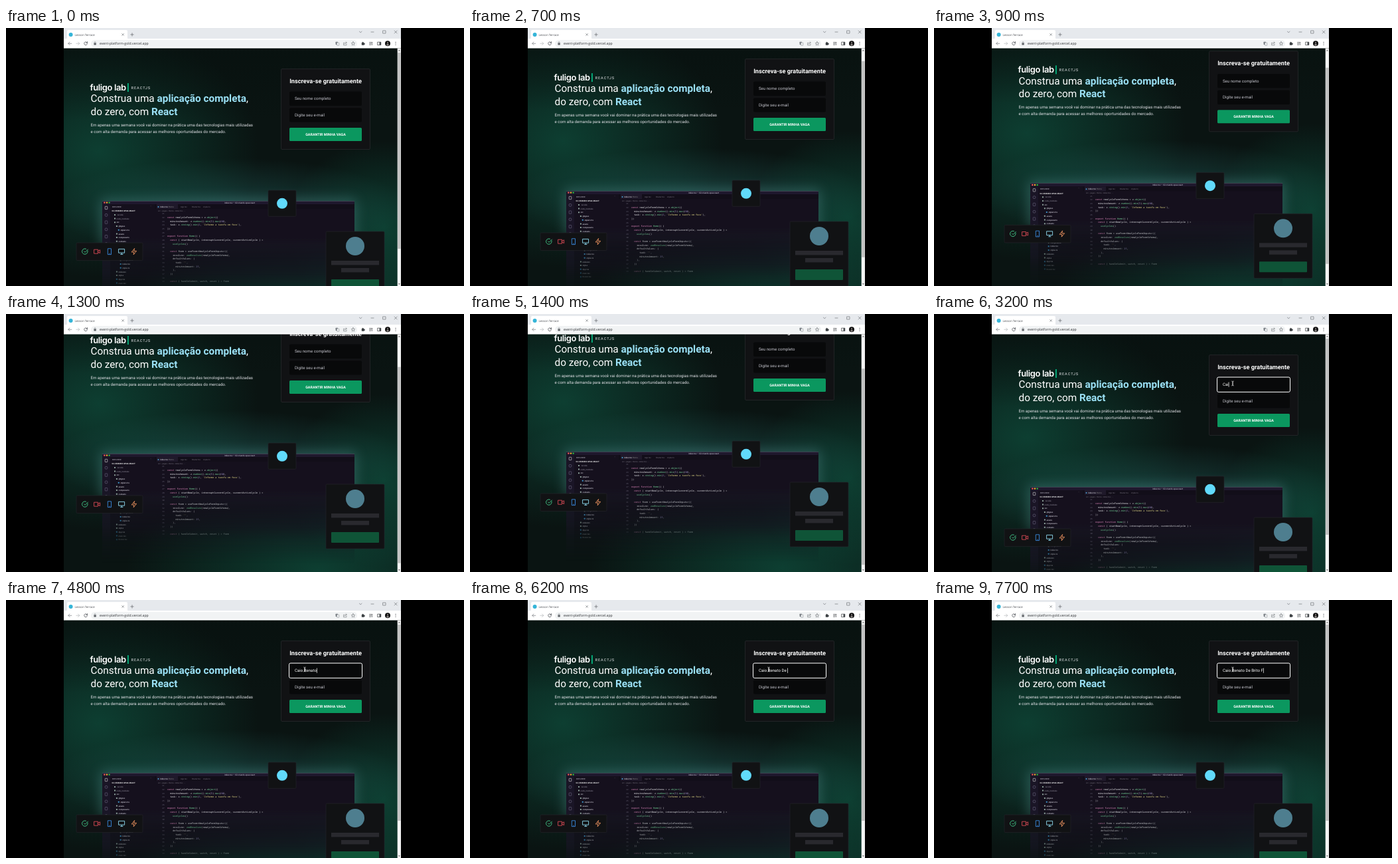
An HTML page for the animation above (8 s loop, 690 px wide and 388 px high).

```html
<!DOCTYPE html>
<html lang="pt-BR">
<head>
<meta charset="utf-8">
<title>Lesson Terrace</title>
<style>
html, body { margin: 0; width: 100%; height: 100%; overflow: hidden; background: #000; }
svg { display: block; width: 690px; height: 388px; font-family: Roboto, sans-serif; text-rendering: geometricPrecision; }
.ui { font-family: "Open Sans", sans-serif; }
.mono { font-family: "Noto Sans Mono", monospace; font-weight: 500; }
.line { fill: none; stroke-linecap: round; stroke-linejoin: round; }
</style>
</head>
<body>
<svg id="stage" viewBox="0 0 690 388"></svg>
<script>
const LOOP = 8000, TICK = 100;
const NAME = 'Caio Renato De Brito F';
const SCROLL = [[500, 0], [600, 7], [700, 15], [1300, 50], [1400, 53], [1500, 47], [1800, 5], [1900, 0]];
// time at which the number of typed letters is reached
const TYPED = [[2800, 1], [3000, 2], [3200, 3], [3400, 4], [3800, 5], [3900, 6], [4100, 7], [4200, 8],
  [4300, 10], [4800, 11], [5000, 12], [5400, 13], [5800, 14], [6000, 15], [6500, 16], [7000, 18],
  [7100, 20], [7400, 21], [7700, 22]];
const FOCUS = 2000;

const rect = (x, y, w, h, fill, more = '') =>
  `<rect x="${x}" y="${y}" width="${w}" height="${h}" fill="${fill}" ${more}/>`;
const dot = (x, y, r, fill, more = '') => `<circle cx="${x}" cy="${y}" r="${r}" fill="${fill}" ${more}/>`;
const text = (x, y, size, fill, str, more = '') =>
  `<text x="${x}" y="${y}" font-size="${size}" fill="${fill}" ${more}>${str}</text>`;
const line = (d, color, width = 0.8) => `<path class="line" d="${d}" stroke="${color}" stroke-width="${width}"/>`;
const glow = (id, color, alpha) => `<radialGradient id="${id}">
  <stop offset="0" stop-color="${color}" stop-opacity="${alpha}"/>
  <stop offset=".5" stop-color="${color}" stop-opacity="${alpha * 0.5}"/>
  <stop offset="1" stop-color="${color}" stop-opacity="0"/></radialGradient>`;
const blob = (id, x, y, rx, ry) => `<ellipse cx="${x}" cy="${y}" rx="${rx}" ry="${ry}" fill="url(#${id})"/>`;

function backdrop() {
  return rect(87, 30, 504, 430, '#0a1412')
    + blob('green', 140, 185, 240, 190) + blob('green', 470, 435, 290, 150)
    + blob('green', 570, 300, 150, 130) + blob('teal', 335, 270, 270, 75)
    + rect(87, 30, 504, 110, 'url(#shade)');
}

function intro() {
  const strong = s => `<tspan font-weight="700" fill="#9be1f6">${s}</tspan>`;
  return text(126.6, 93.5, 13, '#fff', 'fuligo lab',
      'style="font-family:Inter,sans-serif" font-weight="600" letter-spacing="-.4"')
    + rect(183, 83, 1.8, 13, '#04b47f')
    + text(188.6, 91.9, 5.6, '#e4e4e8', 'REACTJS', 'letter-spacing=".95"')
    + text(127.5, 111.4, 15.35, '#fff', `Construa uma ${strong('aplicação completa')},`)
    + text(127.5, 130.6, 15.35, '#fff', `do zero, com ${strong('React')}`)
    + text(127.5, 147.6, 6.14, '#e1e1e6', 'Em apenas uma semana você vai dominar na prática uma das tecnologias mais utilizadas')
    + text(127.5, 157.6, 6.14, '#e1e1e6', 'e com alta demanda para acessar as melhores oportunidades do mercado.');
}

function form() {
  return rect(414.5, 61.5, 134, 121, '#111214', 'rx="1.5" stroke="#2a2b2f" stroke-width=".7"')
    + text(481.6, 82.8, 9.2, '#fff', 'Inscreva-se gratuitamente', 'font-weight="700" text-anchor="middle"')
    + rect(427, 95.6, 109, 21.4, '#08090a', 'rx="2"')
    + rect(427, 120.2, 109, 21.4, '#08090a', 'rx="2"')
    + rect(426.5, 95, 110, 22.3, 'none', 'id="ring" rx="2.2" stroke="#fff" stroke-width="1"')
    + text(434.9, 108.2, 6.14, '#c4c4cc', 'Seu nome completo', 'id="hint"')
    + text(434.9, 108.2, 6.14, '#fff', '', 'id="typed"')
    + rect(434.9, 102.4, 0.7, 7.4, '#fff', 'id="caret"')
    + text(434.9, 132.8, 6.14, '#c4c4cc', 'Digite seu e-mail')
    + rect(427, 150, 109, 20, '#0b975f', 'rx="1.5"')
    + text(481.5, 162, 5.37, '#fff', 'GARANTIR MINHA VAGA', 'font-weight="700" text-anchor="middle"');
}

const CODE = `const newCycleFormSchema = z.object({
  minutesAmount: z.number().min(5).max(60),
  task: z.string().min(1, 'Informe a tarefa em foco'),
})

export function Home() {
  const { startNewCycle, interruptCurrentCycle, currentActiveCycle } =
    useCycles()

  const form = useForm&lt;NewCycleFormInputs>({
    resolver: zodResolver(newCycleFormSchema),
    defaultValues: {
      task: '',
      minutesAmount: 25,
    },
  })

  const { handleSubmit, watch, reset } = form`.split('\n');

function paint(code) {
  const token = /('[^']*')|\b(const|export|function)\b|(\w+(?=\())|\b(\d+)\b/g;
  const colors = ['#efe68c', '#e88cc4', '#7be0a0', '#a99cd8'];
  return code.replace(token, (s, ...groups) =>
    `<tspan fill="${colors[groups.findIndex(Boolean)]}">${s}</tspan>`);
}

function editor() {
  const tree = ['.vscode', 'node_modules', 'src', ' @types', '  styled.d.ts', ' assets', ' components',
    ' contexts', ' layouts', ' pages', '  History', '  Home', '   components', '   index.tsx', '   styles.ts',
    ' reducers', ' styles', ' App.tsx', ' main.tsx', ' Router.tsx'];
  let s = rect(145, 260, 380, 165, '#15101d', 'rx="2"')
    + rect(145, 260, 380, 5, '#1f182d', 'rx="2"') + rect(145, 265, 12, 160, '#1a1526')
    + rect(157, 265, 67, 160, '#15101d') + rect(224, 265, 301, 7, '#120e19') + rect(227, 265, 32, 7, '#1f192a')
    + rect(145, 260, 380, 0.5, '#5a6670')
    + ['#ff5f57', '#febc2e', '#28c840'].map((c, i) => dot(148.4 + i * 3.6, 262.6, 1.2, c)).join('')
    + text(352, 263.7, 3.1, '#dcdae4', 'index.tsx — 02-criando-spas-react', 'text-anchor="middle"')
    + text(160, 270, 2.8, '#c4c1cf', 'EXPLORER') + text(217, 269, 3, '#aaa', '···')
    + text(159.5, 276.4, 2.9, '#eee', '02-CRIANDO-SPAS-REACT', 'font-weight="700"')
    + text(232, 269.9, 3, '#f0eef5', 'index.tsx <tspan fill="#888">Home</tspan>')
    + dot(229.5, 268.9, 1, '#4aa3d8')
    + ['App.tsx', 'Router.tsx', 'styles.ts'].map((n, i) => text(263 + i * 17, 269.9, 2.9, '#77737f', n)).join('')
    + text(229, 276, 2.8, '#77737f', 'src › pages › Home › index.tsx › ...');
  for (let i = 0; i < 8; i++) {
    const y = 270.5 + i * 10.8;
    s += i % 2 ? dot(151, y, 2, 'none', 'stroke="#6d6884" stroke-width=".6"')
      : rect(149.2, y - 2.2, 3.6, 4.4, 'none', `rx=".6" stroke="${i ? '#6d6884' : '#ddd'}" stroke-width=".6"`);
  }
  tree.forEach((name, i) => {
    const x = 163 + name.search(/\S/) * 2.9, y = 282 + i * 5.7;
    s += rect(x, y - 2.1, 2, 2, name.includes('.t') ? '#3f93c8' : '#93a8a0', 'rx=".5"')
      + text(x + 3.6, y, 2.9, i < 2 ? '#817d8b' : '#d0cdd8', name.trim(), 'font-weight="500"');
  });
  for (let i = -1; i < CODE.length; i++) {
    const y = 286.1 + i * 5.67, code = CODE[i] || '';
    s += text(238.6, y, 2.8, '#6b6678', 22 + i, 'text-anchor="end" class="mono"');
    if (code) s += text(243 + code.search(/\S/) * 2.07, y, 3.45, '#f4f4f8', paint(code.trim()), 'class="mono"');
  }
  return rect(142, 257, 386, 70, '#5b9e9c', 'rx="5" opacity=".35" filter="url(#soft)"')
    + `<g mask="url(#fade)">${s}</g>`;
}

function badges() {
  const panel = (x, y, w, h) => rect(x, y, w, h, '#111214', 'rx="1.5" stroke="#27282c" stroke-width=".6"');
  return panel(395, 244, 42, 39.3) + dot(416, 263.8, 8, '#61dafb')
    + panel(106, 323, 100, 26.6)
    + line('M123 335v1a4.2 4.2 0 1 1-2.5-3.8M123.4 333l-4.3 4.3-1.5-1.5', '#43cf8d', 0.9)
    + line('M133 333.2h5.6v6H133zM138.6 335.4l3-1.6v4.8l-3-1.6z', '#d94a55', 0.9)
    + line('M153.7 331.8h4.8v8.8h-4.8zM155.8 339.2h.6', '#3a8be0', 0.9)
    + line('M170 332.4h8.6v5.8H170zM172.6 340.4h3.4M174.3 338.4v2', '#8fdcf2', 0.9)
    + line('M193.4 331.8l-4.2 5.2h3.6l-.6 3.8 4.4-5.4H193z', '#ee9460', 0.9)
    + panel(482, 306, 88, 97) + dot(526, 328, 14, '#4e7e8f')
    + rect(490, 350, 72, 6.4, '#29292e') + rect(505, 361, 42, 6.4, '#29292e')
    + rect(490, 378, 72, 16, '#0f5437', 'rx="1"');
}

function chrome() {
  const ink = '#5f6368';
  return rect(87, 0, 508, 17, '#e6e9ed') + rect(87, 16, 508, 14.5, '#fff')
    + '<path d="M90 17q2 0 2-2V5q0-2 2-2h87q2 0 2 2v10q0 2 2 2z" fill="#fff"/>'
    + dot(97.6, 9.9, 3, '#35b5d8')
    + text(103.5, 11.6, 4.35, '#45484d', 'Lesson Terrace', 'class="ui"')
    + line('M174.7 8.5l2.8 2.8m0-2.8l-2.8 2.8', ink, 0.6)
    + line('M187.8 9.9h4.4M190 7.7v4.4', ink, 0.7)
    + line('M532.4 5.2l1.8 1.6 1.8-1.6M550 6h4M568 4h4v4h-4zM585.2 4l4 4m0-4l-4 4', '#55595e', 0.55)
    + rect(128, 18, 401, 10.8, '#f1f3f4', 'rx="5.4"')
    + line('M98.8 23.3h-5m2.2-2.2l-2.2 2.2 2.2 2.2', '#777b80', 0.7)
    + line('M105.8 23.3h5m-2.2-2.2l2.2 2.2-2.2 2.2', '#b5b8bb', 0.7)
    + line('M122.2 22a2.4 2.4 0 1 0 .3 1.8M122.6 20.6v1.8h-1.8', '#4b4f54', 0.8)
    + rect(132.4, 22.6, 3.4, 2.8, ink, 'rx=".4"') + line('M133.1 22.5v-.8a1 1 0 0 1 2 0v.8', ink, 0.5)
    + text(141, 25.2, 5.15, '#2b2d30', 'event-platform-gold.vercel.app', 'class="ui"')
    + rect(496.6, 20.8, 3.4, 4.2, '#777c82', 'rx=".4"')
    + rect(498.4, 22, 3.4, 4.2, '#f1f3f4', `rx=".4" stroke="#777c82" stroke-width=".5"`)
    + line('M510 22.2h-1.4v3.6h4.4v-1.4M510 24q.4-2 3-2m-1-1.2l1.4 1.2-1.4 1.2', ink, 0.55)
    + line('M523 20.6l.8 1.8 2 .2-1.5 1.3.4 2-1.7-1-1.7 1 .4-2-1.5-1.3 2-.2z', ink, 0.55)
    + rect(535.8, 22, 4, 3.8, '#3c4043', 'rx=".4"') + dot(537.6, 21.7, 0.9, '#3c4043') + dot(540, 23.8, 0.9, '#3c4043')
    + line('M547.6 21.6h4.4M547.6 23.4h2.4M547.6 25.2h2M551.4 25.6v-3', '#3c4043', 0.7)
    + line('M560 21.2h4.8v4.4H560z', '#3c4043', 0.7) + rect(562.6, 21.2, 2.2, 4.4, '#3c4043')
    + dot(575, 23.3, 4, '#111') + dot(575, 22, 1.1, '#8b8583')
    + '<path d="M573.2 26.4q0-3 1.8-3t1.8 3z" fill="#8b8583"/>'
    + [21.4, 23.3, 25.2].map(y => dot(587, y, 0.55, '#4b4f54')).join('')
    + rect(589.7, 30.5, 5.3, 357.5, '#f5f5f5')
    + rect(590.2, 37, 4.4, 295, '#c1c1c1', 'id="thumb"')
    + '<path d="M590.9 34.6l1.5-1.8 1.5 1.8zM590.9 384.2l1.5 1.8 1.5-1.8z" fill="#666"/>';
}

const stage = document.getElementById('stage');
stage.innerHTML = `<defs>
  ${glow('green', '#10614b', 0.55)}${glow('teal', '#2c7d78', 0.4)}
  <linearGradient id="shade" x2="0" y2="1">
    <stop offset="0" stop-color="#07100e" stop-opacity=".6"/><stop offset="1" stop-color="#07100e" stop-opacity="0"/>
  </linearGradient>
  <linearGradient id="dim" gradientUnits="userSpaceOnUse" x1="0" y1="315" x2="0" y2="425">
    <stop offset="0" stop-color="#fff"/><stop offset=".5" stop-color="#999"/><stop offset=".68" stop-color="#444"/><stop offset="1" stop-color="#000"/>
  </linearGradient>
  <mask id="fade" maskUnits="userSpaceOnUse" x="87" y="200" width="510" height="260">${rect(87, 200, 510, 260, 'url(#dim)')}</mask>
  <filter id="soft" x="-20%" y="-60%" width="140%" height="220%"><feGaussianBlur stdDeviation="9"/></filter>
  <clipPath id="view">${rect(87, 30, 503, 358, '#fff')}</clipPath></defs>
  ${rect(0, 0, 690, 388, '#000')}
  <g clip-path="url(#view)"><g id="page">${backdrop()}${intro()}${form()}${editor()}${badges()}</g></g>
  ${chrome()}
  <g id="pointer">${line('M-1.3-3.4q1.3 0 1.3.8v5.2q0 .8-1.3.8M1.3-3.4q-1.3 0-1.3.8v5.2q0 .8 1.3.8', '#e8e8e8', 0.7)}</g>`;

const [page, thumb, ring, hint, typed, caret, pointer] =
  ['page', 'thumb', 'ring', 'hint', 'typed', 'caret', 'pointer'].map(id => document.getElementById(id));
const show = (el, on) => el.setAttribute('visibility', on ? 'visible' : 'hidden');

function scrollAt(t) {
  const i = SCROLL.findIndex(([time]) => time > t);
  if (i < 1) return 0;
  const [[t0, y0], [t1, y1]] = [SCROLL[i - 1], SCROLL[i]];
  return y0 + (y1 - y0) * (t - t0) / (t1 - t0);
}

function draw(now) {
  const t = Math.floor(now % LOOP / TICK) * TICK;
  const y = scrollAt(t);
  page.setAttribute('transform', `translate(0 ${-y})`);
  thumb.setAttribute('y', 37 + y * 0.853);

  const count = TYPED.reduce((n, [time, total]) => t >= time ? total : n, 0);
  // a trailing space has no measured width of its own
  const gap = NAME[count - 1] === ' ' ? 1.52 : 0;
  typed.textContent = NAME.slice(0, count).trimEnd();
  caret.setAttribute('x', 434.9 + (count ? typed.getComputedTextLength() + gap : 0));
  show(hint, !count);
  [ring, caret, pointer].forEach(el => show(el, t >= FOCUS));
  pointer.setAttribute('transform', `translate(${t < 2400 ? 449 : 450} 104.4)`);
  requestAnimationFrame(draw);
}
requestAnimationFrame(draw);
</script>
</body>
</html>
```
